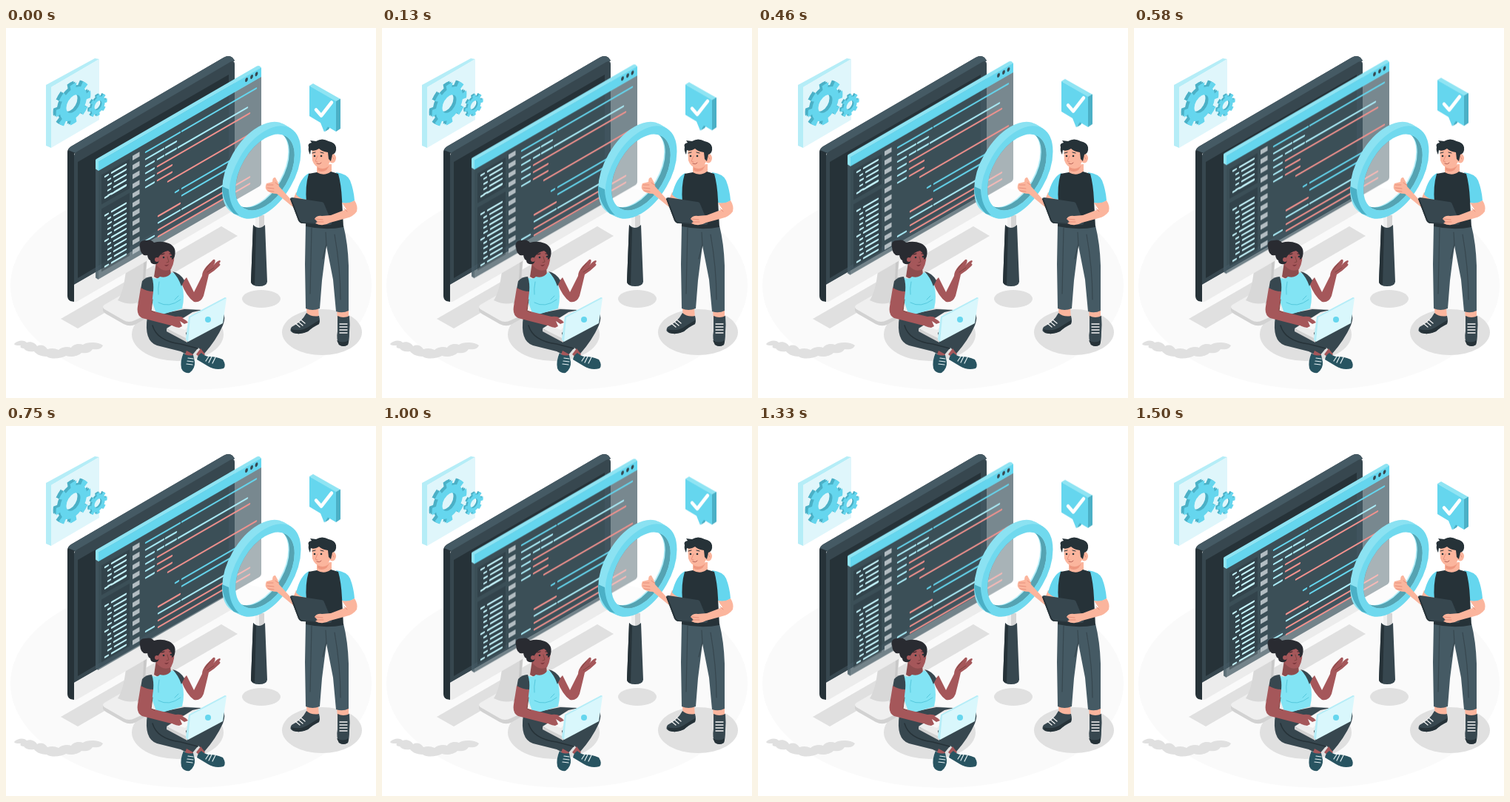
Recreate the animation shown at these times as an HTML page without scripts. Size 500 px wide and 500 px high, loop 1540 ms.

```html
<!DOCTYPE html>
<html lang="en">
<head>
<meta charset="utf-8">
<title>Code review</title>
<style>
  html, body { margin: 0; width: 100%; height: 100%; overflow: hidden; background: #fff; }
  svg { display: block; width: 100%; height: 100%; }
  .float { animation: float 1540ms linear infinite; }
  @keyframes float {
    0%, 97.4%, 100% { transform: translateY(0); }
    48.7% { transform: translateY(-10px); }
  }
  .line { fill: none; stroke-linecap: round; stroke-linejoin: round; }
  .skin { fill: #fbb59d; }
  .brown { fill: #a5575a; }
  .ink { fill: #263238; }
  .slate { fill: #37474f; }
  .steel { fill: #455a64; }
  .cyan { fill: #65d6ee; }
  .pale { fill: #8fe4f3; }
  .teal { fill: #4bb0c6; }
  .shade { fill: #e0e0e0; }
</style>
</head>
<body>
<svg viewBox="0 0 500 500" xmlns="http://www.w3.org/2000/svg">
  <defs>
    <g id="gear" fill="none">
      <circle r="16" stroke-width="10"/>
      <circle r="23.5" stroke-width="7" pathLength="16" stroke-dasharray="1" stroke-dashoffset=".5"/>
    </g>
    <g id="solidGear">
      <use href="#gear" transform="translate(-4 -2) matrix(.866 -.5 0 1 0 0)" stroke="#4bb0c6"/>
      <use href="#gear" transform="translate(-2 -1) matrix(.866 -.5 0 1 0 0)" stroke="#4bb0c6"/>
      <use href="#gear" transform="matrix(.866 -.5 0 1 0 0)" stroke="#65d6ee"/>
    </g>
    <path id="cell" d="M171 0h9.500v6.300h-9.500z"/>
    <g id="cells"><use href="#cell"/><use href="#cell" y="12.7"/><use href="#cell" y="25.4"/></g>
    <path id="outer" d="M134 0h4M143 0h19"/>
    <g id="inner"><path d="M138 0h3M146 0h16M138 6.900h4M147 6.900h15"/></g>
    <g id="rows"><use href="#outer"/><use href="#inner" y="6.9"/><use href="#inner" y="20.7"/></g>
    <clipPath id="hole"><circle r="46" transform="matrix(.866 -.5 0 1 350 195)"/></clipPath>
  </defs>

  <!-- floor and shadows -->
  <ellipse cx="250" cy="348" rx="244" ry="141" fill="#fafafa"/>
  <g class="shade">
    <path d="M74 393 291 268 313 281 97 406z"/>
    <ellipse cx="345" cy="366" rx="26" ry="12"/>
    <ellipse cx="427" cy="411" rx="54" ry="31"/>
    <ellipse cx="232" cy="414" rx="62" ry="36"/>
    <path d="M11 427c4-5 13-6 17-2 6-2 12 1 14 5 5-3 11-1 14 4 6-2 11-1 15 1 4-4 12-5 17-3 3-5 11-6 16-4 5-4 21-4 27 1-2 5-9 6-14 5-3 5-10 6-15 5-5 5-15 6-21 4-7 4-20 5-26 1-9 0-15-4-17-7-6 1-11 0-14-4-5 0-5-3-4-4-5 0-8 0-9-2z"/>
  </g>

  <!-- monitor -->
  <path d="M131 377v5q1 3 7 6l21 12q8 4 15 1l62-35v-8z" fill="#d2d2d2"/>
  <path d="M133 374l50-29q8-4 16 0l34 16q5 3 0 7l-59 27q-8 4-15 0l-26-15q-4-3 0-6z" fill="#efefef"/>
  <path d="M162 328 191 311 186 366Q172 378 151 368 159 356 162 328z" fill="#d8d8d8"/>
  <path d="M186 315l4-2-4 53-9 7q9-20 9-58z" fill="#c8c8c8"/>
  <path d="M83 168q0-5 5-8L294 40q7-4 12 0l3 4-217 126v200l-5-1q-4-2-4-7z" class="ink"/>
  <path d="M84 165q1-3 4-5L294 40q7-4 12 0l3 4-215 125z" class="steel"/>
  <path d="M92 173q0-4 4-6L303 46q6-3 6 3v173L92 347z" class="slate"/>
  <path d="M92 347 309 222v20q0 4-4 6L97 369q-5 3-5-2z" fill="#ececec"/>
  <path d="M97 181 301 63v153L97 338z" class="ink"/>

  <!-- gears card -->
  <path d="M54 77 120 41 126 42 61 80v82l-7-3z" fill="#b5edf7"/>
  <path d="M61 80 126 42v82L61 162z" fill="#dff6fb"/>
  <use href="#solidGear" transform="translate(91 102.500)"/>
  <use href="#solidGear" transform="translate(124.500 104.500) scale(.52)"/>

  <!-- code window -->
  <g class="float">
    <path d="M121 179.500 125 181.500V340l-4-2.500z" class="steel" opacity=".85"/>
    <path d="M121 178.500q0-1 2-2L339 51.500q2-1 4 0l2 2.500-220 127v12l-4-2.500z" class="pale"/>
    <g transform="matrix(1 -.577 0 1 0 0)">
      <path d="M125 264.500H345V408q0 3.500-3 3.500H125z" fill="#455a64" opacity=".72"/>
      <path d="M129 273h38v40h-38zM129 319h38v85h-38z" class="ink" opacity=".38"/>
      <path d="M125 252.600H345v12.400H125z" class="cyan"/>
      <g class="slate">
        <ellipse cx="325" cy="257.500" rx="1.900" ry="2.700"/>
        <ellipse cx="332" cy="257.500" rx="1.900" ry="2.700"/>
        <ellipse cx="338.500" cy="257.500" rx="1.900" ry="2.700"/>
      </g>
      <g fill="#b3bdc2">
        <use href="#cells" y="271.300"/><use href="#cells" y="309.400"/>
        <use href="#cells" y="347.500"/><use href="#cell" y="385.600"/><use href="#cell" y="398.300"/>
      </g>
      <g class="line" stroke-width="2.400">
        <g stroke="#c4f3fa">
          <use href="#outer" y="278"/><use href="#inner" y="285"/>
          <use href="#inner" y="299"/><use href="#outer" y="306.500"/>
          <use href="#rows" y="330.500"/><use href="#rows" y="365"/><use href="#outer" y="399.500"/>
        </g>
        <path stroke="#aaecf7" d="M189 286.200h24M216 286.200h14M189 295.700h11M205 295.700h8M216 295.700h14M233 295.700h93M189 305.200h11M189 314.700h11M189 324.200h11M206 382h29M238 382h70M189 396.500h11"/>
        <path stroke="#65d6ee" d="M189 276.700h46M238 276.700h100M229 354h4M238 354h88M238 363.500h76"/>
        <path stroke="#f2928e" d="M205 305.200H329M205 314.700h19M205 324.200h19M219 333.700H338M206 372.800h29M206 391.500H329M206 400.500H329"/>
      </g>
    </g>
  </g>

  <!-- magnifier -->
  <path d="M337 253h12v16q-6 5-12 0z" fill="#d5d5d5"/>
  <path d="M337 253h5v17l-5-1z" fill="#f0f0f0"/>
  <path d="M334 266q8 8 16 0l3 77q-1 6-11 6t-11-6z" class="slate"/>
  <path d="M334 266q2 4 4 4l-2 77q-5-1-5-4z" class="ink"/>
  <g fill="none" stroke="#8be2f2" stroke-width="10">
    <circle r="51.500" transform="matrix(.866 -.5 0 1 341 190)"/>
    <circle r="51.500" transform="matrix(.866 -.5 0 1 344 191.700)"/>
    <circle r="51.500" transform="matrix(.866 -.5 0 1 347 193.400)"/>
  </g>
  <g clip-path="url(#hole)">
    <circle r="46" transform="matrix(.866 -.5 0 1 343 191)" fill="#fff" opacity=".36"/>
    <circle r="52" transform="matrix(.866 -.5 0 1 343 191)" fill="none" stroke="#55a3b2" stroke-width="12"/>
  </g>
  <circle r="51" transform="matrix(.866 -.5 0 1 350 195)" fill="none" stroke="#70d9ee" stroke-width="10"/>
  <path d="M292 214q1 23 16 37l7 2q-13-12-14-35z" class="teal"/>

  <!-- woman -->
  <g>
    <path d="M191 390q-5 33 13 39l32 8 14 7 10-12 8 8q16-18 25-38 6-16-4-20l-48-2z" class="slate"/>
    <path d="M198 402q6 21 38 25l23 6" class="line" stroke="#263238" stroke-width="1.500"/>
    <path d="M244 436l9 5-3 7-9-4zM263 433l6 8-6 5-6-5z" class="brown"/>
    <path d="M240 439q4 5 13 3l2 9q1 9-7 15-8 1-11-6-2-10 3-21z" fill="#285461"/>
    <path d="M264 439q5 5 11 5 9 0 18 4 5 8 1 12-11 3-21-3l-15-9q1-6 6-9z" fill="#285461"/>
    <path d="M246 446l7 1m-8 3 8 1m-9 3 8 1M274 444l-4 6m8-6-4 8m9-7-4 8" class="line" stroke="#e8f3f5" stroke-width="1.200"/>
    <path d="M237 345l7-8 10 20 11-22q0-6 6-13l9-9q4-1 2 5l-2 3q6-7 9-7 2 1-1 4 3 1 0 4-6 6-14 11-2 9-7 29-4 10-13 8-10-7-17-25z" class="brown"/>
    <path d="M276 318l-7 9m12-3-9 6" class="line" stroke="#7f4541"/>
    <path d="M203 316l19 6 1 13q-10 9-23 1z" fill="#8d4c4e"/>
    <path d="M196 337q8 4 12-1 10 3 16-6 11 4 14 17 4 16 0 32l-33 10q-9-19-12-38z" fill="#82e4f4"/>
    <path d="M206 371q14 8 30-4m-29-24q-2 10-1 17m27 2-5 5" class="line" stroke="#55c8dc"/>
    <path d="M225 329q10 2 16 12l-4 8q-4-12-12-20z" class="slate"/>
    <path d="M184 342q5-6 13-6 3 9 2 20-8 2-17-3z" class="slate"/>
    <path d="M182 351q8 5 17 5l-3 26 33 8q12-2 17 8l-9 8q-9 1-14-4l-39-10q-8-4-6-16z" class="brown"/>
    <path d="M198 367l-2 15 5 2" class="line" stroke="#7f4541"/>
    <path d="M203 298q14-8 24 2 2 15-4 26-11 5-19-5z" class="brown"/>
    <path d="M218 309l2 7-3 1" class="line" stroke="#7f4541"/>
    <circle cx="213" cy="310" r="1.300" class="ink"/><circle cx="223" cy="309" r="1.300" class="ink"/>
    <path d="M210 306l4-1m7 0 3 0" class="line" stroke="#2b1f24"/>
    <path d="M214 320q4 1 6-1-1 3-4 3z" fill="#7a353b"/>
    <path d="M181 296q-2-9 8-9 7-2 11 3 10-3 20 1 11 5 8 17-1 4-4 5 1-9-5-12-9 2-13 9 2 8-3 9-8 1-8-5-3-1-4-7-9 2-10-11z" fill="#292b31"/>
    <circle cx="204" cy="313" r="3" class="brown"/>
  </g>

  <!-- laptop -->
  <path d="M217 406 252 384 279 378 243 412 246 423z" fill="#ececec"/>
  <path d="M217 406l28 14v5l-28-15z" fill="#d2d2d2"/>
  <path d="M224 402l25-15 10 3-17 18z" fill="#f8f8f8"/>
  <path d="M218 391q19-4 28 7l-5 2-6-4 3 7-4 2q-8-1-16-7z" class="brown"/>
  <path d="M247 390 296 364 298 365 293 399 246 424 243 421z" fill="#d9f7fc"/>
  <path d="M247 390 296 364 298 365 249 391 246 424 243 421z" fill="#b5edf7"/>
  <circle cx="273" cy="394" r="4" class="cyan"/>

  <!-- man -->
  <g>
    <path d="M406 377l16 1 1 15-16 4zM447 380l16 1 0 13-15 0z" class="skin"/>
    <path d="M406 385q7 6 17 4 2 8 0 11-8 4-15 10-10 5-20 2-6-3-2-8 14-7 20-19z" class="slate"/>
    <path d="M385 407q14 4 25-4l13-8v5q-8 3-15 10-10 5-20 2z" class="ink"/>
    <path d="M448 389q8 4 16 0 1 12 0 22 0 12-2 17-6 4-12 0-4-8-2-18z" class="slate"/>
    <path d="M447 422q8 5 16 0l-1 6q-6 4-12 0z" class="ink"/>
    <path d="M398 394l6 5m-9-2 6 5m-10-3 6 5M451 400h10m-10 4h10m-10 4h10m-10 4h10" class="line" stroke="#f3f3f3" stroke-width="1.300"/>
    <path d="M405 265l51 2q6 24 7 54l0 61q-8 4-17 1l-4-43-9-46-6 47-3 38q-10 4-19 0l-1-60z" class="steel"/>
    <path d="M432 276l1 18m0-2-5 20m16-33q8 45 8 88m-39-97-2 89" class="line" stroke="#37474f" stroke-width="1.200"/>
    <path d="M392 222l16 6-2 14q-7 8-17 1l-23-19q-8 0-13-4-4-4-1-10l8-2q0-7 4-6 4 6 5 12l18 20z" class="skin"/>
    <path d="M353 212l8 0m-8 4 9 1m-8 3 8 1m2-12q3 3 5 3" class="line" stroke="#e8907c"/>
    <path d="M410 196q-12 5-18 29 6 7 15 7l8-22zM446 195q15 2 19 11 5 13 6 27-8 6-17 3z" class="cyan"/>
    <path d="M420 185l20-1 0 13q-10 9-20 1z" class="skin"/>
    <path d="M421 188q8 5 16-2l-4 6q-7 4-12 0z" fill="#ee977f"/>
    <path d="M409 197l11-2q10 6 19-1l10 3q4 14 5 35l2 37q-24 5-51-1l1-32q-2-22 3-39z" class="ink"/>
    <path d="M413 160q15-7 26 3l0 15q-4 12-14 11-8-1-11-10z" class="skin"/>
    <ellipse cx="441" cy="176" rx="5" ry="6.500" class="skin"/>
    <path d="M440 173l3 4" class="line" stroke="#e8907c"/>
    <path d="M409 161q-2-5 4-6l-2-3 8 1q8-5 17 0 9 2 10 8 1 8-5 10l-2 9-3-3-1-9q-8-1-12-5-6 4-11 2l-1 6q-3-5-2-10z" class="ink"/>
    <circle cx="417" cy="173" r="1.300" class="ink"/><circle cx="426" cy="173" r="1.300" class="ink"/>
    <path d="M414 169l4-1m7 0 4 1" class="line" stroke="#263238"/>
    <path d="M421 173l-3 7 3 1" class="line" stroke="#e8907c"/>
    <path d="M420 183q4 2 6-1" class="line" stroke="#b45f55"/>
    <path d="M384 231q0-2 3-2l39 6q3 0 4 3l10 24q1 4-3 4l-36-2q-4 0-6-4z" class="slate"/>
    <path d="M384 231l2 0 11 29q2 3 5 3l36 2-37-1q-4 0-6-4z" class="ink"/>
    <path d="M454 236q9 2 17-3 5 8 3 15-5 7-14 9l-22 6q-10 6-20 1l3-2-4-4q3-5 10-4l12-1 21-8z" class="skin"/>
    <path d="M418 258l10 1m-8 3 9 0m28-18 4 4" class="line" stroke="#e8907c"/>
  </g>

  <!-- speech bubble -->
  <g class="float">
    <path d="M410 78 415 75 452 96 446 99.500z" class="pale"/>
    <path d="M446 99 452 95.500V136L446 140zM431 140l5-3 2-3-4-2z" class="teal"/>
    <path d="M410 78 446 99V140L435 133.500 430 140.500 425 128 410 119z" class="cyan"/>
    <path d="M419 110.500l7 8 14-18" class="line" stroke="#fff" stroke-width="4.500"/>
  </g>
</svg>
</body>
</html>
```
